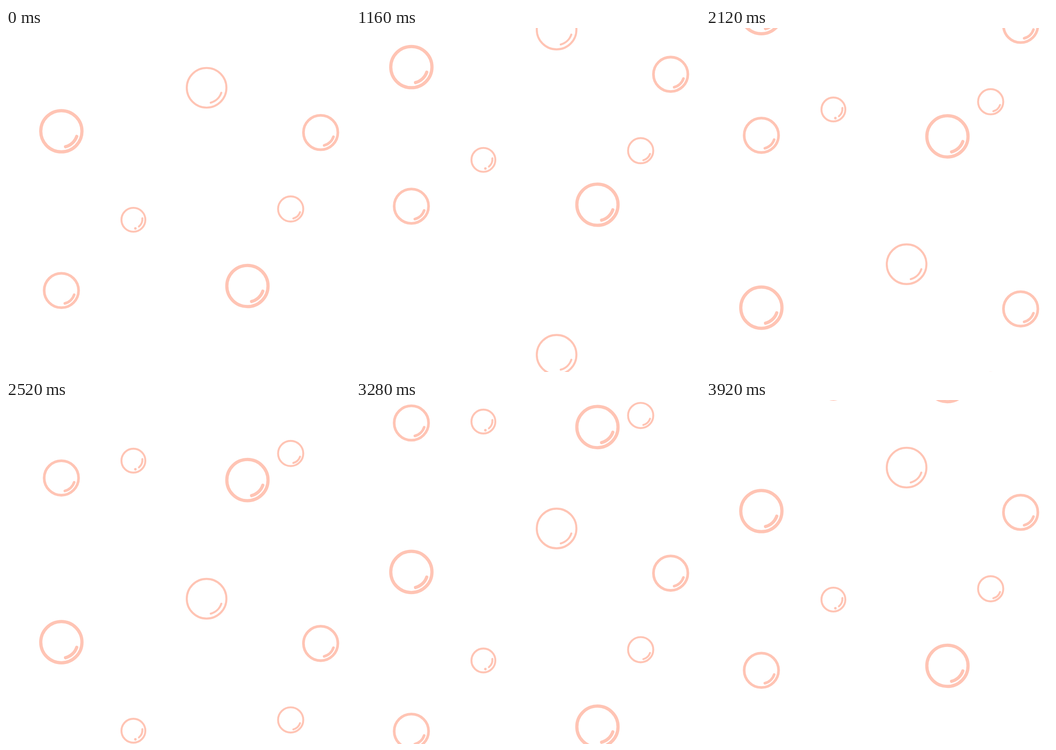
These frames come from a looping animation (748 px wide and 748 px high, 3.96 s). An HTML page without scripts:

```html
<!DOCTYPE html>
<html lang="en">
<head>
<meta charset="utf-8">
<title>Rising bubbles</title>
<style>
  @property --tick  { syntax: "<number>";  inherits: true; initial-value: 0; }
  @property --frame { syntax: "<integer>"; inherits: true; initial-value: 0; }

  html, body { margin: 0; width: 100%; height: 100%; overflow: hidden; background: #fff; }

  /* A 60 fps motion shown at 25 fps: 2.4 frames per tick, rounded down. */
  svg {
    display: block;
    width: 748px;
    height: 748px;
    fill: none;
    stroke: #ffc4b4;
    stroke-linecap: round;
    --frame: calc(var(--tick) * 2.4 - 0.4);
    animation: tick 3.96s steps(99) -1ms infinite;
  }
  @keyframes tick { from { --tick: 0; } to { --tick: 99; } }

  .arriving { transform: translateY(calc((240 - var(--frame)) * 3.395px)); }
  .leaving > use { transform: translateY(calc(var(--frame) * var(--speed) * -1px)); }

  .dot { fill: #ffc4b4; stroke: none; }
</style>
</head>
<body>
<svg viewBox="0 0 748 748">
  <defs>
    <g id="large" stroke-width="7">
      <circle r="44.8"/>
      <path d="M33.4 11.2A35 35 0 0 1 9 33.7"/>
    </g>
    <g id="medium" stroke-width="5.8">
      <circle r="37.4"/>
      <path d="M27.8 9.3A29.2 29.2 0 0 1 7.6 28.1"/>
    </g>
    <g id="thin" stroke-width="4.4">
      <circle r="43.1"/>
      <path d="M32 10.8A33.6 33.6 0 0 1 8.9 32.4"/>
    </g>
    <g id="small" stroke-width="4.2">
      <circle r="27.4"/>
      <path d="M20.4 7A21.4 21.4 0 0 1 5.7 20.6"/>
    </g>
    <g id="dotted" stroke-width="4.2">
      <circle r="26"/>
      <path d="M19.5 -3.5A21 21 0 0 1 12 14.6"/>
      <circle class="dot" cx="4.3" cy="18.7" r="2.8"/>
    </g>
  </defs>

  <g class="arriving">
    <use id="b1" href="#large" x="120.4" y="224.5"/>
    <use id="b2" href="#thin" x="436.2" y="130"/>
    <use id="b3" href="#medium" x="684.2" y="227.2"/>
    <use id="b4" href="#dotted" x="277" y="417"/>
    <use id="b5" href="#small" x="619" y="393.5"/>
    <use id="b6" href="#medium" x="120.4" y="570.8"/>
    <use id="b7" href="#large" x="525" y="561"/>
  </g>

  <g class="leaving">
    <use href="#b1" style="--speed: 2.022"/>
    <use href="#b2" style="--speed: 1.834"/>
    <use href="#b3" style="--speed: 1.834"/>
    <use href="#b4" style="--speed: 1.888"/>
    <use href="#b5" style="--speed: 1.836"/>
    <use href="#b6" style="--speed: 2.657"/>
    <use href="#b7" style="--speed: 2.562"/>
  </g>
</svg>
</body>
</html>
```
